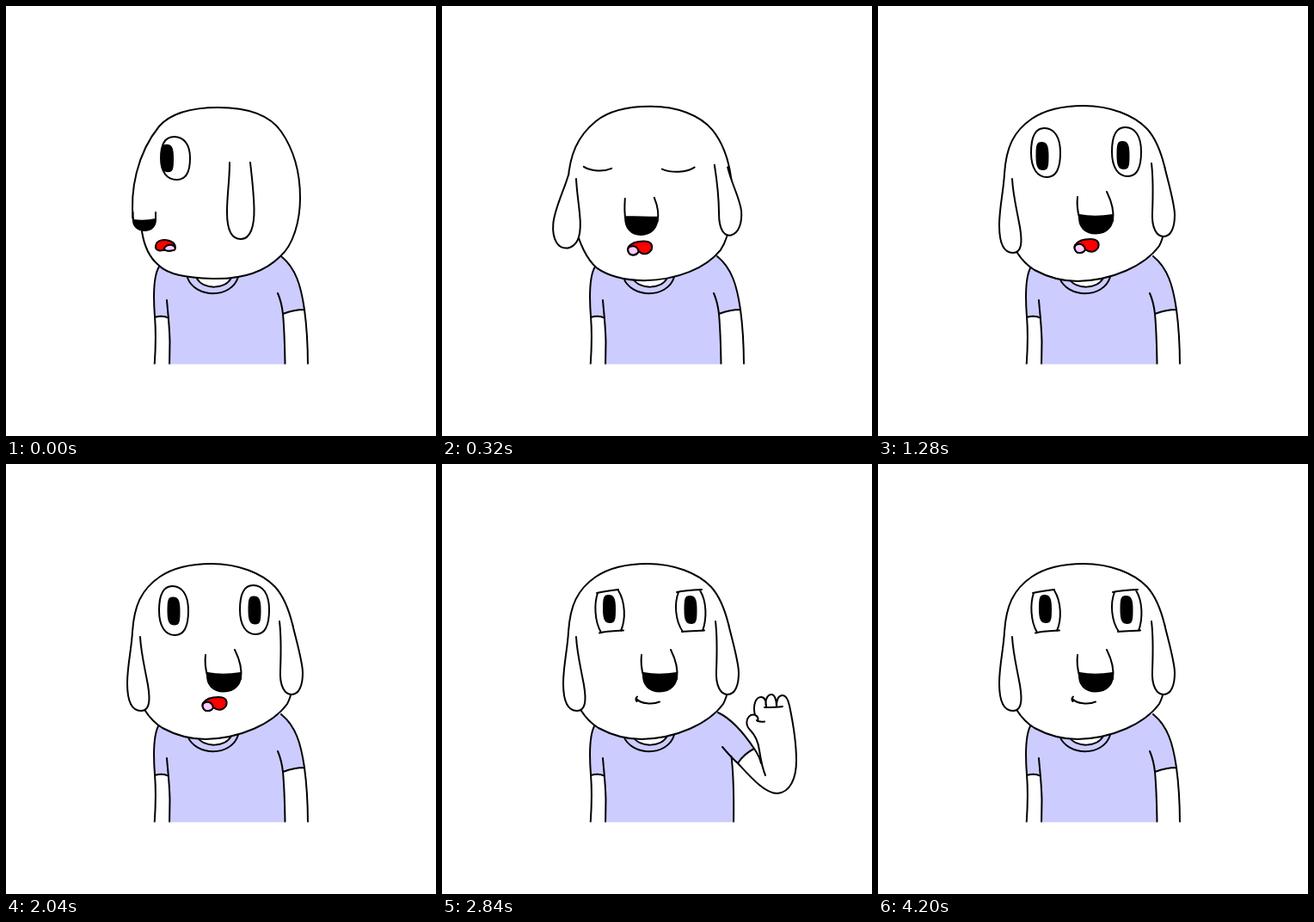
An HTML page for the animation above (4400 ms loop, 500 by 500 pixels).

```html
<!DOCTYPE html>
<html lang="en">
<head>
<meta charset="utf-8">
<title>Turn and wave</title>
<style>
  html, body { margin: 0; width: 100%; height: 100%; overflow: hidden; background: #fff; }
  svg { display: block; width: 100%; height: 100%; }
</style>
</head>
<body>
<svg id="stage" viewBox="0 0 500 500" fill="none" stroke="#000" stroke-width="2" stroke-linecap="round" stroke-linejoin="round"></svg>
<script>
const LOOP = 4400, STEP = 40, SHIRT = '#ccccff';
const stage = document.getElementById('stage');

// Three key poses of the head: side view, half turned, front view.
const head = [
  'M148 250 C144 215 152 172 178 140 C192 124 215 118 247 118 C280 118 306 126 320 146 C338 172 342 200 342 223 C342 250 334 278 319 291 C302 308 275 318 240 317 C208 316 188 312 177 301 C164 290 160 275 158 262',
  'M146 214 C148 185 158 160 178 139 C192 124 215 118 245 118 C280 117 303 128 316 145 C335 170 341 200 341 222 C341 250 334 278 319 291 C302 309 275 318 240 318 C205 317 188 312 177 301 C160 284 148 245 146 214',
  'M147 195 C149 165 157 146 179 131 C197 119 218 116 239 116 C270 116 298 127 313 143 C323 154 329 170 333 186 C338 215 338 258 327 279 C310 302 273 319 232 320 C212 320 195 314 182 307 C174 302 167 295 162 287'
];
const rightEar = [
  'M260 182 C260 205 257 218 257 240 C257 260 262 271 273 271 C284 271 289 257 288.5 235 C288 215 286 200 284 182',
  'M303 204 C304.5 228 303 234 297 251 C287 279 292 290 303 290 C316 289 324 265 324 240 C324 222 324 213 322 203',
  'M318 183 C320 200 320 215 319 240 C318 258 324 268 332 268 C341 268 345 257 345 243 C345 230 338 207 333 186'
];
const leftEar = [
  'M177 214 C175 230 175 245 175 260 C175 278 179 287 185 287 C194 287 194 275 192 255 C190 235 186 220 186 201',
  'M147 214 C145 230 145 245 145 260 C145 278 149 287 155 287 C164 287 164 275 162 255 C160 235 156 220 156 201',
  'M147 195 C146 215 141 235 141 255 C141 275 146 287 157 287 C167 287 168 275 165 257 C161 235 157 220 156 201'
];
const flungLeft = 'M147 195 C140 215 128 235 126 252 C124 272 133 282 144 280 C156 277 160 265 160 250 C160 235 157 220 156 201';
const flungRight = 'M318 183 C321 200 324 215 325 240 C326 258 332 266 340 264 C349 261 352 250 351 238 C349 223 338 207 333 186';
const nose = [
  'M148 249 C156 250 165 250 174 248 C174 256 169 261 161 261 C153 261 148 256 148 249',
  'M182 248 C192 246 205 247 217 250 C216 261 209 268 199 268 C188 268 182 260 182 248',
  'M234 243 C245 245 260 245 273 243 C274 256 266 264.5 253 264.5 C241 264.5 233 257 234 243'
];
const bridge = [
  'M147.5 240 C147 243 147 246 148 249 M174 240 C174 243 174 245 174 249',
  'M184 227 C184 235 182 241 182 249 M218 233 C219 239 219 245 217 252',
  'M232 222 C231 230 232 238 234 246 M266 216 C272 228 275 238 273 250'
];
const shutEyes = [
  'M151 200 C151 200 151 200 151 200 M178 192 C188 196 205 195 214 190',
  'M151 200 C157 205 165 206 172 205 M236 207 C248 210 262 209 269 202',
  'M174 178 C185 184 203 184 214 178 M269 178 C280 184 298 184 310 178'
];
const eyeSpot = ['197 177 17 25', '253 200 17 26', '289 169.5 17 28.5'];
const mouthSpot = ['0 0', '27 6', '58 0'];

// The right arm and shirt side, [raised, hanging].
const arm = {
  shirt: [
    'M178 303 C172 313 171 335 173 362 C180 360 184 360 188 363 C190 375 190 395 190 560 L339 420 C339.5 390 339.5 365 336.5 340 L344 348 C349 340 355 335 363 331 C353 316 338 297 321 289 Z',
    'M178 303 C172 313 171 335 173 362 C180 360 184 360 188 363 C190 375 190 395 190 560 L325 553 C325 440 325 390 322 358 L322 358 C330 355 338 353 347 353 C343 325 337 305 320 291 Z'
  ],
  lines: [
    'M321 289 C338 297 353 316 363 331 C355 335 349 340 344 348 C338 343 332 336 326 329 M336.5 340 C339.5 365 339.5 390 339 420 M363 331 C367 337 370 343 371 348 M344 348 C358 363 375 383 390 383 C405 382 412 365 412 345 C412 320 408 300 404 281',
    'M320 291 C337 305 343 325 347 353 C338 353 330 355 322 358 C321 349 319 341 316 334 M322 358 C325 390 325 440 325 553 M347 353 C350 375 351 395 351 420 M322 358 C325 390 325 440 325 553 C325 560 392 535 392 515 C392 490 388 470 384 451'
  ]
};
const hand = 'M404 281 C402 272 399 269 396 269 C391 269 389 275 389 282 M375 283 C382 283 389 283 396 282 M376.5 280 C376 271 380 268 383 268 C387 268 389 275 389 282' +
  ' M364 292 C361 280 365 271 371 271 C376 271 377 277 377 283 M375 299.5 C371 300 368 300 366 298' +
  ' M367 299 C369 294 364 290 359 292 C353 296 353 304 358 309 C365 316 368 325 369 333 C371 346 373 355 376 362';

const mix = (a, b, t) => {
  const to = b.match(/-?[\d.]+/g);
  let i = 0;
  return a.replace(/-?[\d.]+/g, n => (+n + (to[i++] - n) * t).toFixed(2));
};
const pose = (keys, u) => u <= 1 ? mix(keys[0], keys[1], u) : mix(keys[1], keys[2], u - 1);
const path = (d, fill = 'none', extra = '') => `<path d="${d}" fill="${fill}" ${extra}/>`;
const move = (x, y, inner) => `<g transform="translate(${x} ${y})">${inner}</g>`;

// Rounded oval, boxier than an ellipse as `square` grows.
function oval(x, y, rx, ry, lean, square) {
  const a = rx * square, b = ry * square, top = x - lean, low = x + lean;
  return `M${x - rx} ${y} C${x - rx} ${y - b} ${top - a} ${y - ry} ${top} ${y - ry} C${top + a} ${y - ry} ${x + rx} ${y - b} ${x + rx} ${y}` +
    ` C${x + rx} ${y + b} ${low + a} ${y + ry} ${low} ${y + ry} C${low - a} ${y + ry} ${x - rx} ${y + b} ${x - rx} ${y}Z`;
}
const pupil = (x, y, ry = 16.5) => path(oval(x, y, 7.5, ry, .8, .78), '#000', 'stroke="none"');

function openEye(x, y, rx, ry, look) {
  return path(oval(x, y, rx, ry, 1.5, .65), '#fff') + pupil(x + look[0], y + look[1], Math.min(16.5, ry * .65));
}

function calmEyes() {
  return path('M180 150 C188 148 196 147 205 146 M181 150 C177 162 177 182 185 196 M205 147 C213 160 214 180 208 194 M183 196.5 C192 194 200 194 211 193.5') +
    path('M273 149 C282 147 292 146.5 302 146 M275 149 C270 162 271 182 280 195 M300 147 C308 160 308 180 303 194 M279 195 C287 194 296 194 305 193.5') +
    pupil(194.5, 168.5) + pupil(289, 169.5);
}

function mouth(u) {
  const [x, y] = pose(mouthSpot, u).split(' ').map(Number);
  if (u < 1.5) return move(x, y,
    path('M174 279 C175 272 183 271 190 273 C196 275 198 279 196 283 C192 285 187 285 184 283 C180 286 173 284 174 279Z', '#f00') +
    path('M184 283 C184 279 189 277 193 278 C198 279 197 284 195 284 C191 285 186 285 184 283Z', '#fcf'));
  return move(x - 58, y,
    path('M229 278 C233 272 240 271 247 271 C255 271 258 275 256 281 C252 287 246 287 241 283 C239 288 232 288 230 285 C228 282 228 280 229 278Z', '#f00') +
    path('M230 278 C236 275 240 278 241 283 C239 288 232 288 230 285 C228 282 228 280 230 278Z', '#fcf'));
}

function body(drop) {
  return '<clipPath id="floor"><path d="M0 0H500V416.5H0Z"/></clipPath><g clip-path="url(#floor)">' +
    path(mix(...arm.shirt, drop), SHIRT, 'stroke="none"') +
    path('M178 303 C172 313 171 335 173 361 C175 385 174 400 172.5 420 M173 362 C180 360 184 360 189 363 M187 342 C188 355 190 370 190.5 390 L190 420') +
    path(mix(...arm.lines, drop)) +
    move(-20 * drop, 170 * drop, path(hand)) +
    path('M211 316 C220 340 262 341 270 315', SHIRT) +
    path('M222 317 C230 330 255 330 262 316', '#fff') + '</g>';
}

// Value at time t from a list of steps that starts at a given time.
const stepAt = (t, start, values) => values[Math.min(values.length - 1, Math.floor((t - start) / STEP))];

function gaze(t) {
  if (t < 1200) return [9.5, 0];
  if (t < 2000) return stepAt(t, 1200, [[7, 2], [2, 4], [-4, 4], [-8, 3], [-9, 2]]);
  return stepAt(t, 2000, [[-4, 1], [0, .5]]);
}

function eyes(t, u) {
  const shut = (t >= 200 && t < 360) || (t >= 2720 && t < 2800) || (t >= 3320 && t < 3440);
  if (shut) return path(pose(shutEyes, u));
  if (t >= 2800) return calmEyes();
  const [x, y, rx, fullRy] = pose(eyeSpot, u).split(' ').map(Number);
  const squeeze = t >= 160 && t < 200 ? .6 : t >= 360 && t < 400 ? .7 : t >= 2680 ? .75 : 1;
  const look = t < 200 ? [-9.5, 0] : gaze(t);
  const ry = fullRy * squeeze;
  return openEye(x, y, rx, ry, look) + (u > 1 ? openEye(x - 94, y + 1, rx, ry, look) : '');
}

function draw(time) {
  const t = Math.floor(time / STEP) * STEP;
  const u = t < 160 ? 0 : stepAt(t, 160, [.33, .67, 1, 1.25, 1.6, 1.9, 2.04, 2]);
  const fling = t < 280 ? 0 : stepAt(t, 280, [.3, .8, 1, .4, 0]);
  const drop = t < 2680 ? 1 : t < 4120 ? stepAt(t, 2680, [.8, .5, .2, .05, 0]) : stepAt(t, 4120, [.3, .7, 1]);
  const ear = path(mix(pose(leftEar, u), flungLeft, fling), '#fff');
  const face = path(pose(head, u), '#fff');
  const smile = path('M227 270.5 C225 272 225 274.5 226.5 276 M226 273 C231 279 245 280 253 276.5');
  stage.innerHTML = body(drop) +
    (u > 1 ? face + ear : ear + face) +
    path(mix(pose(rightEar, u), flungRight, fling), '#fff') +
    eyes(t, u) +
    path(pose(nose, u), '#000') + path(pose(bridge, u)) +
    (t < 2760 ? mouth(u) : smile);
}

const start = performance.now();
function tick() {
  draw((performance.now() - start) % LOOP);
  requestAnimationFrame(tick);
}
tick();
</script>
</body>
</html>
```
